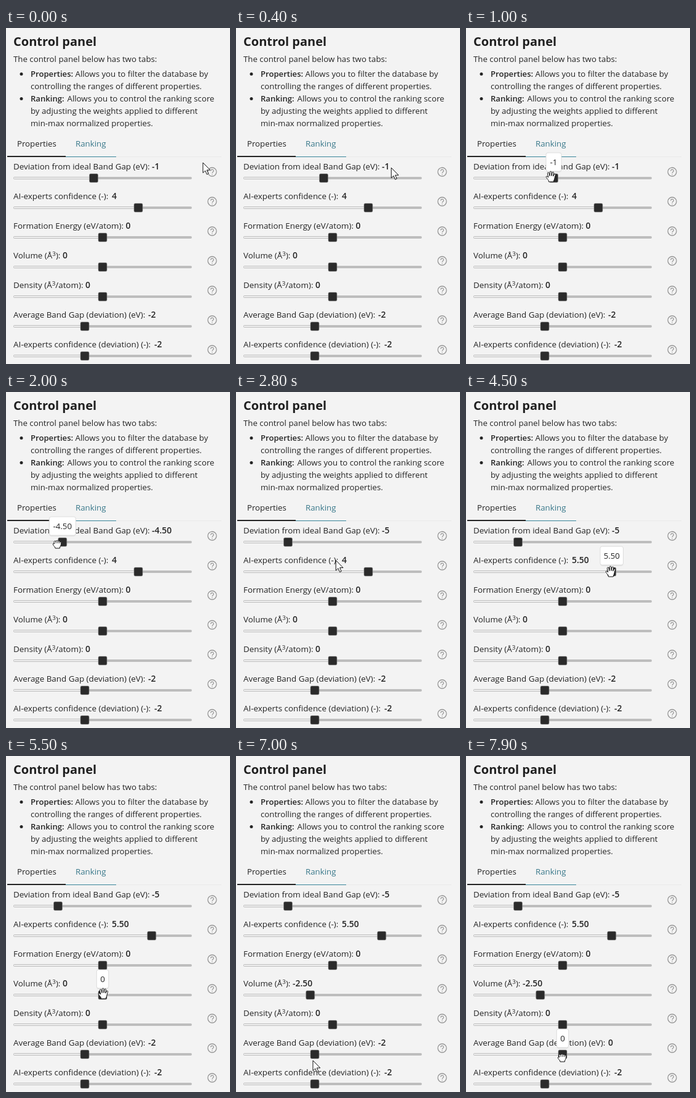
Write an HTML page that moves like this. It is 364x544 px and loops after 8000 ms.

```html
<!DOCTYPE html>
<html lang="en">
<head>
<meta charset="utf-8">
<title>Control panel</title>
<style>
  html, body { margin: 0; width: 100%; height: 100%; overflow: hidden; background: #f3f3f3; }
  svg { display: block; }
  text { font: 13.25px "Open Sans", "Noto Sans", sans-serif; fill: #242424; white-space: pre; }
  text.label { font-size: 13.4px; }
  text.strong { font-size: 13.1px; font-weight: 600; }
  text.value { font-size: 13.9px; font-weight: 600; }
  text.title { font-size: 20px; font-weight: 700; fill: #1f1f1f; }
  text.link { fill: #39788a; }
  .sup { font-size: 9.8px; }
</style>
</head>
<body>
<svg id="stage" width="364" height="544" viewBox="0 0 364 544"></svg>
<script>
const LOOP = 8000, STEP = 100;
const RAIL = 12, CENTER = 157, UNIT = 14.5;
const stage = document.getElementById("stage");

function add(tag, attrs, content = "", parent = stage) {
  const node = document.createElementNS("http://www.w3.org/2000/svg", tag);
  for (const key in attrs) node.setAttribute(key, attrs[key]);
  node.innerHTML = content;
  return parent.appendChild(node);
}
const write = (x, y, content, cls = "") => add("text", { x, y, class: cls }, content);

add("rect", { width: 364, height: 544, fill: "#f3f3f3" });
write(12, 29, "Control panel", "title");
write(12, 55, "The control panel below has two tabs:");
for (const cy of [74.5, 114.5]) add("circle", { cx: 25, cy, r: 2.5, fill: "#242424" });
write(40, 79, "Properties:", "strong");
write(112.5, 79, "Allows you to filter the database by");
write(40, 99, "controlling the ranges of different properties.");
write(40, 119, "Ranking:", "strong");
write(99.5, 119, "Allows you to control the ranking score");
write(40, 139, "by adjusting the weights applied to different");
write(40, 159, "min-max normalized properties.");
write(18, 192, "Properties");
write(113, 192, "Ranking", "link");
add("rect", { x: 2, y: 208, width: 348, height: 1, fill: "#e9e9e9" });
add("rect", { x: 2, y: 207, width: 95, height: 2, fill: "#242424" });
add("rect", { x: 97, y: 208, width: 82, height: 1, fill: "#39859a" });

const cubed = 'Å<tspan class="sup" dy="-4.5">3</tspan>';
const rows = [
  ["Deviation from ideal Band Gap (eV):", 237, -1],
  ["AI-experts confidence (-):", 172, 4],
  ["Formation Energy (eV/atom):", 194.5, 0],
  [`Volume (${cubed}<tspan dy="4.5">):</tspan>`, 92, 0],
  [`Density (${cubed}<tspan dy="4.5">/atom):</tspan>`, 129, 0],
  ["Average Band Gap (deviation) (eV):", 231, -2],
  ["AI-experts confidence (deviation) (-):", 241, -2]
].map(([label, valueX, start], i) => {
  const y = 243 + 48 * i;
  write(RAIL, y - 14, label, "label");
  const value = write(valueX, y - 14, "", "value");
  add("rect", { x: RAIL, y: y - 2, width: 290, height: 4, rx: 2, fill: "#bdbdbd" });
  const track = add("rect", { x: RAIL + 1, y: y - 1, height: 2, fill: "#f0f0f0" });
  add("circle", { cx: 335, cy: y - 10, r: 7, fill: "none", stroke: "#969696", "stroke-width": 1.3 });
  add("path", {
    d: `M332.7 ${y - 11.5}c0-3.2 4.7-3.2 4.7-.2c0 1.8-2.3 1.6-2.3 3.6M335 ${y - 6.8}v1.3`,
    fill: "none", stroke: "#969696", "stroke-width": 1.2
  });
  const handle = add("rect", { y: y - 7, width: 14, height: 14, rx: 2, fill: "#2b2b2b", stroke: "#8a8a8a", "stroke-width": .6 });
  return { y, start, value, track, handle };
});

const tip = add("g", {});
const tipShadow = add("rect", { y: -40, height: 31, rx: 4, fill: "#000", opacity: .06 }, "", tip);
const tipBox = add("rect", { y: -41, height: 30, rx: 3, fill: "#fff", stroke: "#d6d6d6", "stroke-width": .8 }, "", tip);
const tipText = add("text", { y: -21, "text-anchor": "middle" }, "", tip);

const pointer = add("g", { fill: "#fff", stroke: "#111", "stroke-width": 1, "stroke-linejoin": "round" });
const shapes = {
  arrow: "M0 0V16.5L3.8 13L6.4 19L9 17.8L6.4 12H11.8Z",
  open: "M-3.5 8L-4 5.5C-6 3-8.5.5-7.5-.8C-6.5-1.8-5 .2-4.2 1L-5.6-5.5C-5.8-7.3-3.6-7.8-3.1-6L-2-1.5L-1.7-7.7C-1.6-9.3.8-9.3.9-7.7L1-1.6L2.2-7C2.7-8.6 4.8-8 4.5-6.4L3.7-1L5.4-4.2C6.3-5.5 8-4.7 7.4-3.2C6 1 6 4 4.7 6L4.3 8Z",
  closed: "M-3 10L-3.5 8C-5.5 6-6.8 4.5-6.5 3C-6.2 1.8-4.8 2-4.3 2.7L-4.8.5C-5.3-2-2.6-2.6-1.9-1C-1.3-3 1.2-2.8 1.4-1.2C2.4-2.5 4.2-1.8 4.3-.4C5.6-1.2 6.9-.2 6.7 1.4C6.6 4.5 5.6 6.5 4.6 8L4.4 10ZM-1.8-1V2M1.4-1V2M4.3-.4V2"
};
const pointerPath = add("path", {}, "", pointer);

// Pointer stops: time, x, y.
const stops = [
  [0, 320, 218], [100, 320, 218], [800, 148, 239], [1000, 138, 241], [1200, 136, 241],
  [1300, 136, 241], [2000, 83, 243], [2300, 78, 244], [2500, 78, 244], [3000, 208, 288],
  [3200, 213, 291], [3300, 213, 291], [3600, 220, 291], [4300, 235, 291], [4500, 235, 291],
  [5200, 160, 383], [5500, 158, 385], [5700, 158, 385], [6300, 122, 386], [6500, 122, 386],
  [6900, 125, 493], [7000, 125, 493], [7200, 127, 485], [7300, 127, 485], [7800, 156, 485],
  [8000, 156, 485]
];
const drags = [
  { row: 0, from: 1300, to: 2400 },
  { row: 1, from: 3300, to: 4400 },
  { row: 3, from: 5700, to: 6400 },
  { row: 5, from: 7300, to: 8000 }
];

function pointerAt(t) {
  const i = stops.findIndex((s, n) => n && t <= s[0]);
  const [t0, x0, y0] = stops[i - 1], [t1, x1, y1] = stops[i];
  const k = (t - t0) / (t1 - t0), e = k * k * (3 - 2 * k);
  return { x: x0 + (x1 - x0) * e, y: y0 + (y1 - y0) * e };
}

function valueAt(row, t) {
  const drag = drags.find(d => d.row === row);
  const { start } = rows[row];
  if (!drag || t < drag.from) return start;
  const dx = pointerAt(Math.min(t, drag.to)).x - pointerAt(drag.from).x;
  return Math.round((start + dx / UNIT) * 2) / 2 || 0;
}

const format = v => Number.isInteger(v) ? String(v) : v.toFixed(2);

function render(t) {
  const { x, y } = pointerAt(t);
  const drag = drags.find(d => t >= d.from && t < d.to);
  let active = null;
  rows.forEach((row, i) => {
    const value = valueAt(i, t), label = format(value), cx = CENTER + value * UNIT;
    row.value.textContent = label;
    row.track.setAttribute("width", cx - RAIL - 1);
    row.handle.setAttribute("x", cx - 7);
    const hovered = Math.abs(x - cx) <= 8 && Math.abs(y - row.y) <= 8;
    if (drag ? drag.row === i : hovered) active = { cx, y: row.y, label };
  });

  tip.setAttribute("visibility", active ? "visible" : "hidden");
  if (active) {
    tipText.textContent = active.label;
    const width = [...active.label].reduce((w, c) => w + (c === "-" ? 5.5 : c === "." ? 3 : 7.5), 12);
    for (const box of [tipShadow, tipBox]) {
      box.setAttribute("x", -width / 2);
      box.setAttribute("width", width);
    }
    tip.setAttribute("transform", `translate(${active.cx} ${active.y})`);
  }
  pointerPath.setAttribute("d", shapes[drag ? "closed" : active ? "open" : "arrow"]);
  pointer.setAttribute("transform", `translate(${x} ${y})`);
}

const began = performance.now();
function tick() {
  const t = (performance.now() - began) % LOOP;
  render(Math.floor(t / STEP) * STEP);
  requestAnimationFrame(tick);
}
render(0);
requestAnimationFrame(tick);
</script>
</body>
</html>
```
